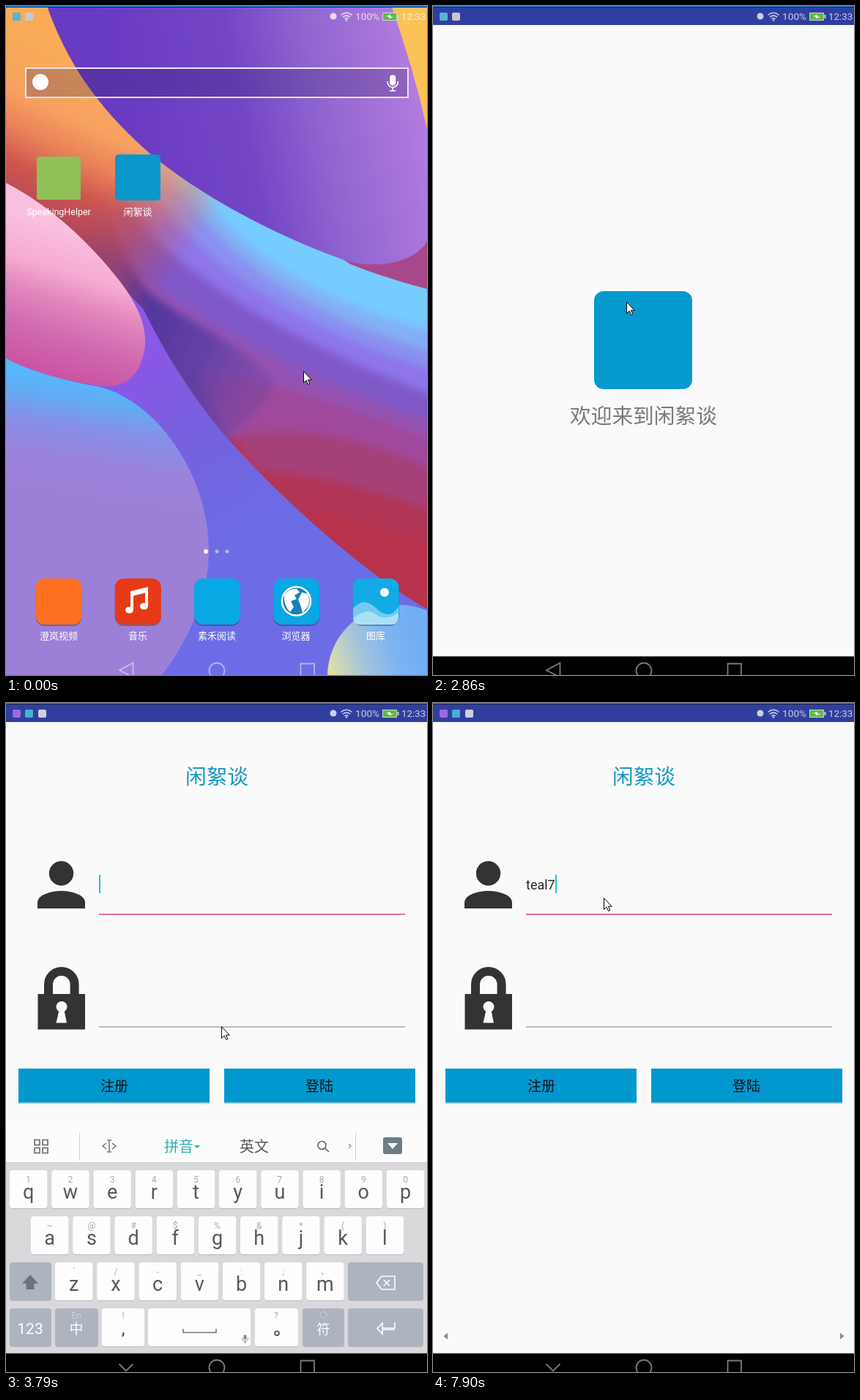
An HTML page that plays this animation: 575 px wide and 915 px high, repeating every 8000 ms.

```html
<!DOCTYPE html>
<html lang="zh-CN">
<head>
<meta charset="utf-8">
<title>Chat app start</title>
<style>
html, body { margin: 0; width: 100%; height: 100%; overflow: hidden; background: #000; }
body, text { font-family: Roboto, "Noto Sans CJK SC", "Noto Sans CJK", sans-serif; }
#stage { position: absolute; left: 0; top: 0; width: 575px; height: 915px; overflow: hidden; }
#stage div, #stage svg { position: absolute; left: 0; top: 0; }
.full { width: 575px; height: 915px; overflow: hidden; }
.mid { text-anchor: middle; }
.label text { font-size: 13px; fill: #fff; text-anchor: middle; }

#app { transform-origin: 180px 235px; animation: open 8s step-end infinite; }
#splash { animation: push 8s step-end infinite; }
#intro { animation: appear 8s step-end infinite; }
#dim { background: #100410; animation: dim 8s step-end infinite; }
#login { background: #fafafa; box-shadow: -2px 0 #f6f6f7; animation: slide 8s step-end infinite; }
#keys { animation: rise 8s step-end infinite; }
#bar { animation: bar 8s step-end infinite; }
.early { animation: early 8s step-end infinite; }
.late { animation: late 8s step-end infinite; }
#cursor { animation: point 8s step-end infinite; }

@keyframes open {
  0% { opacity: 0; transform: scale(.3); }
  14.75% { opacity: .5; transform: scale(.5); }
  16.25% { opacity: .9; transform: scale(.84); }
  17.625% { opacity: 1; transform: scale(.97); }
  19%, 100% { opacity: 1; transform: none; }
}
@keyframes appear {
  0% { opacity: 0; }
  20.5% { opacity: .35; }
  22% { opacity: .7; }
  23.5% { opacity: .92; }
  25%, 100% { opacity: 1; }
}
@keyframes push {
  0% { transform: none; }
  41.75% { transform: translateX(-10px); }
  43.25% { transform: translateX(-43px); }
  44.75%, 100% { transform: translateX(-68px); }
}
@keyframes dim {
  0% { opacity: 0; }
  41.75% { opacity: .02; }
  43.25%, 100% { opacity: .08; }
}
@keyframes slide {
  0% { transform: translateX(580px); }
  41.75% { transform: translateX(520px); }
  43.25% { transform: translateX(228px); }
  44.75% { transform: translateX(24px); }
  46%, 100% { transform: none; }
}
@keyframes rise {
  0% { transform: translateY(320px); }
  46% { transform: translateY(110px); }
  47.375% { transform: none; }
  56%, 100% { transform: translateY(320px); }
}
@keyframes bar { 0% { opacity: 0; } 56%, 100% { opacity: 1; } }
@keyframes early { 0% { opacity: 1; } 46%, 100% { opacity: 0; } }
@keyframes late { 0% { opacity: 0; } 46%, 100% { opacity: 1; } }
@keyframes point {
  0% { transform: translate(405px, 499px); }
  1.5% { transform: translate(402px, 507px); }
  3% { transform: translate(388px, 510px); }
  4.375% { transform: translate(352px, 480px); }
  5.875% { transform: translate(304px, 422px); }
  7.375% { transform: translate(264px, 362px); }
  8.875% { transform: translate(236px, 320px); }
  10.375% { transform: translate(223px, 302px); }
  11.875% { transform: translate(196px, 256px); }
  13.25% { transform: translate(190px, 246px); }
  16.25% { transform: translate(192px, 256px); }
  17.625% { transform: translate(200px, 288px); }
  19% { transform: translate(210px, 316px); }
  20.5% { transform: translate(226px, 348px); }
  22% { transform: translate(243px, 376px); }
  23.5% { transform: translate(255px, 394px); }
  25% { transform: translate(259px, 400px); }
  28.125% { transform: translate(261px, 400px); }
  35.75% { transform: translate(263px, 404px); }
  38.75% { transform: translate(268px, 414px); }
  41.75% { transform: translate(275px, 426px); }
  43.25% { transform: translate(279px, 434px); }
  44.75% { transform: translate(286px, 439px); }
  47.375% { transform: translate(293px, 442px); }
  48.75% { transform: translate(276px, 386px); }
  50.125% { transform: translate(245px, 304px); }
  51.5%, 100% { transform: translate(232px, 266px); }
}

.entry { left: 127px !important; top: 235px !important; height: 25px; font-size: 18px; line-height: 28px; color: #262626; white-space: nowrap; }
.entry i { position: absolute; top: 0; height: 25px; }
.entry u { text-underline-offset: 2px; text-decoration-thickness: 1px; }
.words { left: 46px !important; top: 850px !important; display: flex; gap: 23px; font-size: 31px; line-height: 38px; color: #42424b; white-space: nowrap; }
.words span { position: relative; }
.words small { display: inline-block; width: 13px; font-size: 16px; }
.words span:first-child { color: #fff; }
.words span:first-child::before { content: ""; position: absolute; z-index: -1; left: -4px; right: -18px; top: -3px; height: 38px; background: #e3e4e7; }
</style>
</head>
<body>
<div id="stage">
  <svg class="full" viewBox="0 0 575 915">
    <defs>
      <linearGradient id="base" x1="150" y1="500" x2="300" y2="760" gradientUnits="userSpaceOnUse">
        <stop offset="0" stop-color="#8a57e6"/><stop offset=".5" stop-color="#7462de"/><stop offset="1" stop-color="#6c6de6"/>
      </linearGradient>
      <linearGradient id="warm" x1="120" y1="90" x2="20" y2="300" gradientUnits="userSpaceOnUse">
        <stop offset="0" stop-color="#f9ab58"/><stop offset=".3" stop-color="#f7a161"/><stop offset=".5" stop-color="#e98058"/>
        <stop offset=".68" stop-color="#cf564f"/><stop offset="1" stop-color="#a9415d"/>
      </linearGradient>
      <linearGradient id="fade" x1="145" y1="235" x2="265" y2="320" gradientUnits="userSpaceOnUse">
        <stop offset="0" stop-color="#fff"/><stop offset=".45" stop-color="#aaa"/><stop offset="1" stop-color="#000"/>
      </linearGradient>
      <mask id="left"><rect width="575" height="915" fill="url(#fade)"/></mask>
      <linearGradient id="shade" x1="200" y1="430" x2="350" y2="500" gradientUnits="userSpaceOnUse">
        <stop offset="0" stop-color="#55379f"/><stop offset=".5" stop-color="#5f3fa4" stop-opacity=".9"/><stop offset="1" stop-color="#71459f" stop-opacity=".5"/>
      </linearGradient>
      <linearGradient id="plum" x1="160" y1="190" x2="575" y2="110" gradientUnits="userSpaceOnUse">
        <stop offset="0" stop-color="#693ac2"/><stop offset=".4" stop-color="#7446c6"/><stop offset=".65" stop-color="#9065d0"/><stop offset="1" stop-color="#b67de0"/>
      </linearGradient>
      <linearGradient id="pink" x1="110" y1="310" x2="50" y2="500" gradientUnits="userSpaceOnUse">
        <stop offset="0" stop-color="#fac0e0"/><stop offset=".3" stop-color="#f6abd2"/><stop offset=".5" stop-color="#e286bd"/><stop offset=".75" stop-color="#d068b0"/><stop offset="1" stop-color="#ca54a4"/>
      </linearGradient>
      <linearGradient id="lilac" x1="70" y1="505" x2="45" y2="660" gradientUnits="userSpaceOnUse">
        <stop offset="0" stop-color="#56b8fb"/><stop offset=".2" stop-color="#65a9f2"/><stop offset=".4" stop-color="#8590ea"/><stop offset=".7" stop-color="#9a83da"/><stop offset="1" stop-color="#9c80d8"/>
      </linearGradient>
      <linearGradient id="disc" x1="440" y1="900" x2="560" y2="860" gradientUnits="userSpaceOnUse">
        <stop offset="0" stop-color="#e0dda8"/><stop offset=".35" stop-color="#a5c5d8"/><stop offset=".7" stop-color="#7fb4f2"/><stop offset="1" stop-color="#72aef4"/>
      </linearGradient>
      <path id="sweep" d="M0 0H575V825C510 788 400 700 303 592C250 530 215 470 188 415L100 320L0 245Z"/>
      <clipPath id="inside"><use href="#sweep"/></clipPath>
      <filter id="soft" x="-20%" y="-20%" width="140%" height="140%"><feGaussianBlur stdDeviation="6"/></filter>
    </defs>
    <rect width="575" height="915" fill="url(#base)"/>
    <g clip-path="url(#inside)">
      <g id="bands" filter="url(#soft)"></g>
      <path d="M160 350C200 420 300 440 366 512Q348 560 300 592L180 440Z" fill="url(#shade)" filter="url(#soft)"/>
    </g>
    <use href="#sweep" fill="url(#warm)" mask="url(#left)"/>
    <path d="M450 340L575 300V387Q520 373 470 353Z" fill="#a7488d"/>
    <path d="M520 0H575V175Q556 85 527 0Z" fill="#fbc258"/>
    <path d="M56 0C82 75 125 138 190 196C265 262 385 322 470 350C520 361 562 345 575 322V168Q556 82 526 0Z" fill="url(#plum)"/>
    <path d="M0 242C62 274 114 324 152 372C182 410 192 440 190 464C184 510 160 524 125 519C84 514 38 502 0 482Z" fill="url(#pink)"/>
    <path d="M0 482C38 502 84 513 128 521C205 540 276 640 277 742C278 815 240 880 213 915H0Z" fill="url(#lilac)"/>
    <circle cx="537" cy="917" r="98" fill="url(#disc)"/>

    <rect x="27" y="85" width="522" height="40" fill="#201850" fill-opacity=".23" stroke="#eee4f0" stroke-width="2"/>
    <circle cx="47" cy="104" r="11" fill="#fff"/>
    <g fill="none" stroke="#fff" stroke-width="1.6"><rect x="525" y="95" width="6.5" height="13" rx="3.2" fill="#fff"/><path d="M521 103C521 114 535.500 114 535.500 103M528.200 112V116M524 116H532.500"/></g>
    <rect x="42" y="206" width="60" height="59" rx="3" fill="#8fc155"/>
    <rect x="149" y="203" width="62" height="63" rx="5" fill="#0a97ca"/>
    <g id="dock"></g>
    <g class="label">
      <text x="72" y="286" style="font-size:12.5px">SpeakingHelper</text><text x="180" y="286">闲絮谈</text>
      <text x="72" y="866">澄岚视频</text><text x="180" y="866">音乐</text><text x="288" y="866">素禾阅读</text><text x="396" y="866">浏览器</text><text x="505" y="866">图库</text>
    </g>
    <g fill="#fff"><circle cx="273" cy="746" r="3"/><circle cx="288" cy="746" r="2.500" opacity=".5"/><circle cx="302" cy="746" r="2.500" opacity=".5"/></g>
  </svg>

  <div id="app" class="full">
    <div class="full" style="background:#fafafd"></div>
    <svg id="splash" class="full" viewBox="0 0 575 915">
      <g id="intro">
        <rect x="220" y="390" width="134" height="134" rx="13" fill="#0699cd"/>
        <text class="mid" x="287.500" y="571.500" font-size="28.700" font-weight="500" fill="#7a7a7a">欢迎来到闲絮谈</text>
      </g>
    </svg>
    <svg class="full" viewBox="0 0 575 915"><path d="M0 0H575V26H0Z" fill="#303f9f"/></svg>
    <div id="dim" class="full"></div>
    <div id="login" class="full" style="overflow:visible">
      <svg class="full" viewBox="0 0 575 915">
        <path d="M0 0H575V26H0Z" fill="#303f9f"/>
        <text class="mid" x="288" y="110.500" font-size="28.700" font-weight="500" fill="#1598c8">闲絮谈</text>
        <g fill="#333">
          <circle cx="75.500" cy="233" r="16.700"/>
          <path d="M43 281V273C43 262 62 257 75.500 257S108 262 108 273V281Z"/>
          <path d="M58 400V385A17.800 18 0 0 1 93.600 385V400" fill="none" stroke="#333" stroke-width="12"/>
          <rect x="43.500" y="398" width="64.500" height="48.500"/>
        </g>
        <path d="M73 418L68.500 437.500H83L79 418Z" fill="#fafafa"/><circle cx="76" cy="415.500" r="7.500" fill="#fafafa"/>
        <path d="M127 289H545" stroke="#ef6aa2" stroke-width="2"/>
        <path d="M127 443H545" stroke="#a6a6a6" stroke-width="1.500"/>
        <path d="M17 502H278V548.500H17ZM298 502H559V548.500H298Z" fill="#cfd3d6"/>
        <path d="M17 500H278V546.500H17ZM298 500H559V546.500H298Z" fill="#0098cf"/>
        <g class="mid" font-size="19" font-weight="500" fill="#111"><text x="148" y="531">注册</text><text x="428" y="531">登陆</text></g>
      </svg>
      <div id="name"></div>
    </div>
    <svg id="keys" class="full" viewBox="0 0 575 915"></svg>
    <div id="bar" class="full">
      <svg class="full" viewBox="0 0 575 915"><path d="M20 861.500V870.500L14.500 866ZM556 861.500V870.500L561.500 866Z" fill="#8b8b8b"/></svg>
      <div id="picks"></div>
    </div>
    <svg class="full" viewBox="0 0 575 915"><path d="M0 889.500H575V915H0Z"/></svg>
  </div>

  <svg class="full" viewBox="0 0 575 915">
    <g class="early"><rect x="9" y="9" width="11" height="11" rx="2" fill="#55b5cf"/><rect x="26" y="9" width="11" height="11" rx="2" fill="#c9c6d0"/></g>
    <g class="late"><rect x="9" y="9" width="11" height="11" rx="2" fill="#9a6be0"/><rect x="26" y="9" width="11" height="11" rx="2" fill="#45b0d4"/><rect x="44" y="9" width="11" height="11" rx="2" fill="#cfd0d8"/></g>
    <g fill="#fff" opacity=".75">
      <circle cx="447" cy="14" r="4.500"/>
      <g fill="none" stroke="#fff" stroke-width="1.600"><path d="M457.500 12.500Q465 6 472.500 12.500M460 15.200Q465 11 470 15.200M462.500 17.800Q465 15.800 467.500 17.800"/></g>
      <circle cx="465" cy="19.500" r="1.200"/>
      <g font-size="13.700"><text x="477" y="19">100%</text><text x="540" y="19" font-size="13.300">12:33</text></g>
    </g>
    <rect x="514.500" y="9.500" width="19" height="10" fill="#63b944" stroke="#ccd4d2"/><path d="M534.500 12H536.500V17H534.500Z" fill="#ccd4d2"/><path d="M519 14L525 12V14.500L529.500 15L523 17V14.700Z" fill="#fff"/>
    <g fill="none" stroke="#fff" stroke-width="1.800" opacity=".48">
      <path class="early" d="M173.500 898.500V918L155 908.500Z"/>
      <path class="late" d="M154.500 904L164 913.500L173.500 904"/>
      <circle cx="288" cy="909" r="10.500"/><path d="M402.500 916V899.500H421V916"/>
    </g>
    <path d="M0 0H575V2H0Z" fill="#0f2148"/><path d="M0 0H575V1H0Z" fill="#2a8cf8"/>
  </svg>
  <svg id="cursor" width="14" height="20" viewBox="0 0 14 20"><path d="M1.500 .8V16.400L5.100 13L7.700 18.600L9.900 17.600L7.400 12.200H12.300Z" fill="#fff" stroke="#000"/></svg>
</div>

<script>
const LOOP = 8000;
const $ = id => document.getElementById(id);

// Shows an element only between two times of the loop.
function during(el, from, to) {
  const frame = (opacity, ms) => ({ opacity, offset: ms / LOOP, easing: 'step-end' });
  el.animate([frame(0, 0), frame(1, from), frame(0, to), frame(0, LOOP)],
    { duration: LOOP, iterations: Infinity });
}

// Each state lasts until the next one starts.
function sequence(parent, className, states, html) {
  states.forEach(([from, ...state], i) => {
    const el = document.createElement('div');
    el.className = className;
    el.innerHTML = html(...state);
    parent.append(el);
    during(el, from, i + 1 < states.length ? states[i + 1][0] : LOOP);
  });
}

const GREY = '1px solid #777b7e', CYAN = '2px solid #22c3d6';
sequence($('name'), 'entry', [
  [0, '', GREY], [3680, '', CYAN],
  [4480, 't', GREY, 1], [4720, 'te', GREY, 1], [5080, 'tea', GREY, 1], [5200, 'teas', GREY, 1],
  [5650, 'teas', '', 1], [5970, 'tea', GREY, 1], [6080, 'teal', GREY, 1], [6660, 'teal', '', 1],
  [6780, 'teal', CYAN], [6900, 'teal7', CYAN], [7400, 'teal7', ''], [7900, 'teal7', CYAN]
], (text, caret, composing) =>
  (composing ? `<u>${text}</u>` : text) + (caret ? `<i style="border-left:${caret}"></i>` : ''));

sequence($('picks'), 'words', [
  [0, ''], [4600, '他 她 它 天 太 特 听'], [4840, '特 忒 忑 貣 慝 铽 貸'],
  [5080, 'tea 特殊 特色 特爽 特思'], [5320, 'teas 特殊 tea 特色 特爽'],
  [5970, 'tea 特殊 特色 特爽 特思'], [6080, 'teal 特殊 tea 特色 特爽'], [6780, '']
], line => line && line.split(' ').map((word, i) => `<span><small>${i + 1}</small>${word}</span>`).join(''));

// Wallpaper bands, lowest first: colour, left end, bend, height at the right edge
const bands = [
  ['#b9304c', '430 760', '500 800', 840], ['#b13655', '385 685', '480 700', 735],
  ['#a63f78', '340 635', '450 640', 690], ['#a0499c', '303 590', '440 560', 635],
  ['#9452b4', '240 500', '400 510', 595], ['#8159c8', '185 370', '360 500', 565],
  ['#8e74ea', '195 310', '330 440', 530], ['#8a90f0', '225 285', '340 425', 495],
  ['#84aff5', '248 262', '350 410', 470], ['#76cbff', '264 250', '355 392', 440]
];
$('bands').innerHTML = bands.map(([color, left, bend, y]) =>
  `<path d="M0 0L${left}Q${bend} 600 ${y + 8}V0Z" fill="${color}"/>`).join('');
$('bands').insertAdjacentHTML('afterbegin', '<rect x="-50" width="700" height="915" fill="#b9304c"/><path d="M-50 150H250L310 620H-50Z" fill="#6b429f"/>');

// Dock icons
const glyphs = [
  ['#ff7122', ''],
  ['#e63a17', '<path d="M172 826V802L192 797V821" fill="none" stroke="#fff" stroke-width="4"/><path d="M172 804L192 799" stroke="#fff" stroke-width="6"/><ellipse cx="168.500" cy="826" rx="5.500" ry="4.500"/><ellipse cx="188.500" cy="821" rx="5.500" ry="4.500"/>'],
  ['#08a8e5', ''],
  ['#08a8e5', '<circle cx="396.500" cy="814" r="19.500" fill="#1581b4" stroke="#fff" stroke-width="2.500"/><path d="M380 806Q386 796 397 797L401 802L394 806L397 811L389 814L393 822L388 829Q379 820 380 806ZM404 802L412 804Q416 813 412 822L405 830L402 819L399 812Z"/>'],
  ['#12abe6', '<circle cx="517" cy="802" r="6"/><path d="M474 824Q489 807 506 824T536 822V836Q536 846 526 846H484Q474 846 474 836Z" opacity=".4"/><path d="M474 838Q492 822 505 832T536 830V836Q536 846 526 846H484Q474 846 474 838Z" opacity=".4"/>']
];
$('dock').innerHTML = glyphs.map(([color, art], i) => {
  const x = 40.5 + i * 108.3;
  return `<rect x="${x}" y="785" width="63" height="63" rx="12" fill="#0004"/><rect x="${x}" y="783" width="63" height="63" rx="12" fill="${color}"/><g fill="#fff">${art}</g>`;
}).join('');

// Keyboard
const text = (x, y, size, fill, s) => `<text class="mid" x="${x}" y="${y}" font-size="${size}" fill="${fill}">${s}</text>`;
const line = (d, color, width = 1.6) => `<path d="${d}" fill="none" stroke="${color}" stroke-width="${width}"/>`;
const key = (x, y, w, dark) =>
  `<rect x="${x}" y="${y + 1}" width="${w}" height="52" rx="4" fill="#b9babf"/><rect x="${x}" y="${y}" width="${w}" height="52" rx="4" fill="${dark ? '#adb4bf' : '#fdfdfd'}"/>`;
const row = (x0, y, letters, hints) => [...letters].map((c, i) => {
  const x = x0 + i * 57.2, mid = x + 25.7;
  return key(x, y, 51.5) + text(mid, y + 17, 12, '#a9a9ad', hints[i]) + text(mid, y + 39, 27, '#58585c', c);
}).join('');

$('keys').innerHTML = [
  '<path d="M0 580H575V890H0Z" fill="#fcfcfc"/><path d="M0 629H575V890H0Z" fill="#d9d9dc"/>',
  line('M0 628.500H575M100.500 588V626M477.500 588V626', '#cfcfd2', 1),
  line('M39 597.500H46V604.500H39ZM50 597.500H57V604.500H50ZM39 608.500H46V615.500H39ZM50 608.500H57V615.500H50Z', '#666'),
  line('M138 598H144M141 598V614M138 614H144M137 602L132 606L137 610M145 602L150 606L145 610', '#777'),
  text(236, 613.5, 20, '#31acb9', '拼音'), '<path d="M257 605H265L261 609Z" fill="#31acb9"/>',
  text(339, 613.5, 20, '#58585c', '英文'),
  line('M437 605A5.500 5.500 0 1 1 426 605A5.500 5.500 0 1 1 437 605M436 609L441 614', '#666'),
  line('M468 603L471 606L468 609', '#888', 1.2),
  '<rect x="515" y="594" width="26" height="23" rx="3" fill="#6f7d87"/><path d="M521 602H535L528 610Z" fill="#fff"/>',
  row(5, 639, 'qwertyuiop', '1234567890'),
  row(34, 702, 'asdfghjkl', ['~', '@', '#', '$', '%', '&amp;', '*', '(', ')']),
  row(67, 765, 'zxcvbnm', '´/-_:;、'),
  key(5, 765, 57, 1), '<path d="M33 782L44 794H38.500V802H27.500V794H22Z" fill="#6e747c"/>',
  key(467, 765, 103, 1), line('M513 784H531V802H513L506 793ZM516 789L524 797M524 789L516 797', '#fff'),
  key(5, 828, 57, 1), text(33, 863, 21, '#fff', '123'),
  key(67, 828, 59, 1), text(96, 842, 12, '#d0d4da', 'En'), text(96, 863, 19, '#fff', '中'),
  key(131, 828, 58), text(160, 842, 12, '#a9a9ad', '!'), text(160, 864, 24, '#444', ','),
  key(194, 828, 140), line('M242 856V861H287V856', '#77777c'),
  '<rect x="324.500" y="864" width="4" height="7" rx="2" fill="#888"/>', line('M322.500 868Q322.500 873 326.500 873T330.500 868M326.500 873V876', '#888', 1),
  key(340, 828, 59), text(369, 842, 12, '#a9a9ad', '?'), '<circle cx="370" cy="862" r="3" fill="none" stroke="#444" stroke-width="1.500"/>',
  key(405, 828, 57, 1), '<circle cx="433.500" cy="837" r="4.500" fill="none" stroke="#d0d4da"/>', text(433.5, 863, 18, '#fff', '符'),
  key(467, 828, 103, 1), line('M531 847V855H514V848L507 855.500L514 863V857H531', '#fff')
].join('');
</script>
</body>
</html>
```
